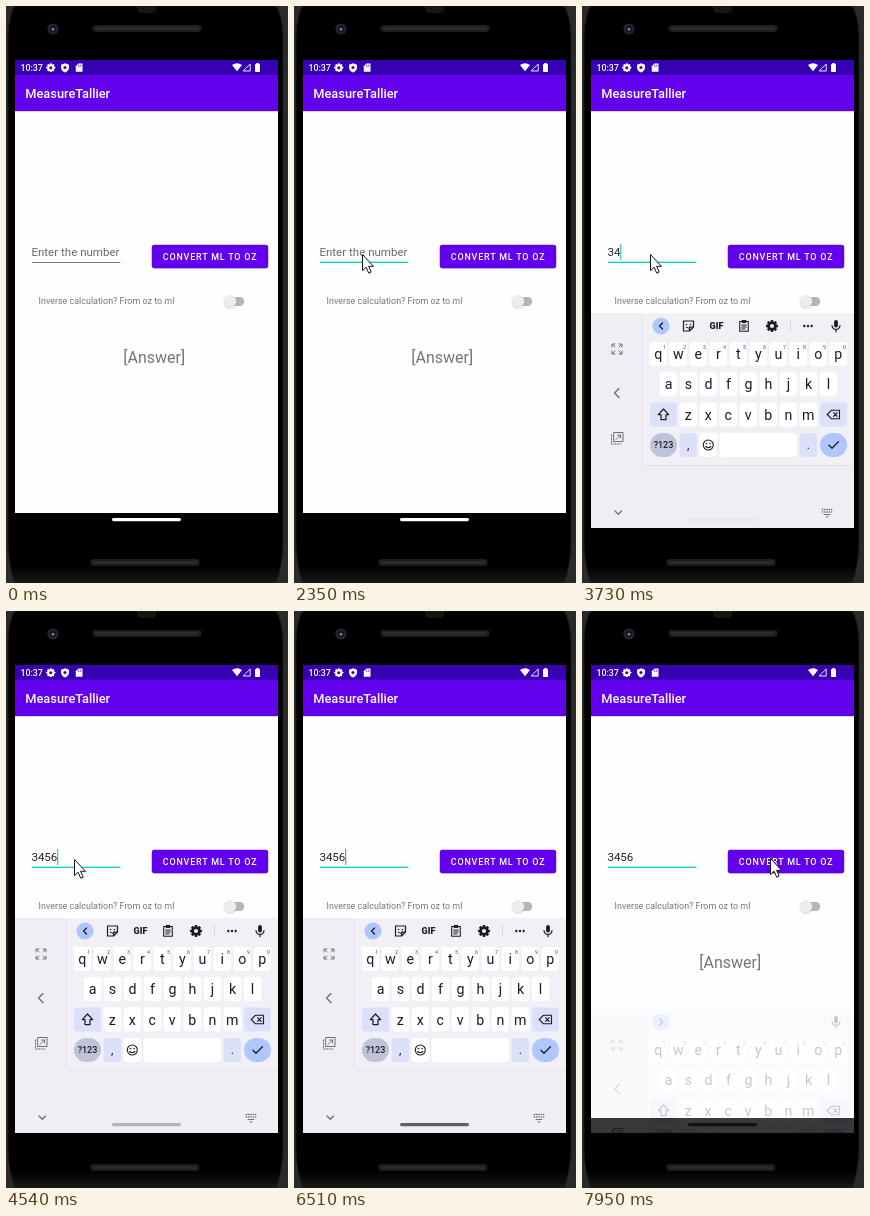
An HTML page for the animation above (8 s loop, 282x577 px).

```html
<!DOCTYPE html>
<html lang="en">
<head>
<meta charset="utf-8">
<title>Unit conversion</title>
<style>
html, body { margin: 0; width: 100%; height: 100%; overflow: hidden; background: #000; }
svg { display: block; width: 100%; height: 100%; font-family: Roboto, Arial, sans-serif; }
text { white-space: pre; }
.line { fill: none; stroke-linecap: round; stroke-linejoin: round; }
</style>
</head>
<body>
<svg id="stage" viewBox="0 0 282 577" xmlns="http://www.w3.org/2000/svg"></svg>
<script>
const LOOP = 8000;
const INK = '#1b1b20', SOFT = '#dce1f9', ACCENT = '#b0c6ff', GREY = '#6f6f76';

const rect = (x, y, w, h, fill, r = 0, more = '') =>
  `<rect x="${x}" y="${y}" width="${w}" height="${h}" rx="${r}" fill="${fill}" ${more}/>`;
const circle = (x, y, r, fill, more = '') =>
  `<circle cx="${x}" cy="${y}" r="${r}" fill="${fill}" ${more}/>`;
const text = (x, y, size, fill, str, more = '') =>
  `<text x="${x}" y="${y}" font-size="${size}" fill="${fill}" ${more}>${str}</text>`;
const line = (d, color, w = 1, more = '') =>
  `<path class="line" d="${d}" stroke="${color}" stroke-width="${w}" ${more}/>`;
const at = (x, y, body) => `<g transform="translate(${x} ${y})">${body}</g>`;
const MID = 'text-anchor="middle"';

function gear(r, color, hole) {
  let teeth = '';
  for (let i = 0; i < 8; i++) {
    teeth += rect(-r * .2, -r, r * .4, r * 2, color, .3, `transform="rotate(${i * 45})"`);
  }
  return teeth + circle(0, 0, r * .78, color) + circle(0, 0, r * .36, hole);
}

function phone() {
  return '<linearGradient id="shell" x2="0" y2="1"><stop offset=".97"/><stop offset="1" stop-color="#181818"/></linearGradient>' +
    rect(0, 0, 282, 577, '#292a2a') +
    '<path d="M9 0Q3 8 2 30V540Q3 562 9 577H270Q276 562 277 540V30Q276 8 270 0Z" fill="url(#shell)" stroke="#1a1a1a"/>' +
    rect(131, -5, 19, 12, '#151515', 4) +
    circle(47, 23, 5.6, '#242629') + circle(47, 23, 3.6, '#15181f') + circle(47, 23.2, 1.3, '#7388c0') +
    rect(86.5, 19, 109, 7, '#1d1d1d', 3) + rect(89, 21, 104, 3, '#2b2b2b', 1.5) +
    rect(84.5, 553, 109, 7, '#1d1d1d', 3) + rect(87, 555, 104, 3, '#2b2b2b', 1.5);
}

function statusBar() {
  const W = '#fff';
  return rect(9, 54, 263, 15.2, '#3700b3') +
    text(14.4, 65, 8.8, W, '10:37', 'font-weight="500"') +
    at(44.8, 61.7, gear(4.3, W, '#3700b3')) +
    `<path d="M59 57.2L63 58.7V61.7Q62.6 65 59 66.4Q55.4 65 55 61.7V58.7Z" fill="${W}"/>` +
    circle(59, 61.6, 1.5, '#3700b3') +
    `<path d="M72.5 57.6H76.5V65.8H69.8V60.2Z" fill="${W}"/>` +
    line('M72.8 59V60.7M74.8 59V60.7', '#3700b3', .7) +
    `<path d="M226 59Q231 55.6 236 59L231 65.3Z" fill="${W}"/>` +
    line('M244.2 58.4V65H237.6Z', W, .9) +
    rect(249, 58, 5, 8, W, .8) + rect(250.3, 57, 2.4, 2, W);
}

function app() {
  return rect(9, 54, 263, 453, '#fefefe') + statusBar() +
    rect(9, 69, 263, 36, '#6200ee') + rect(9, 105, 263, 1, '#dcdae0') +
    text(19.3, 92, 12.8, '#fff', 'MeasureTallier', 'font-weight="500"') +
    text(25.4, 250.1, 11.55, '#6a6a6a', 'Enter the number', 'id="hint"') +
    text(25.4, 250.1, 11.55, '#222', '', 'id="value"') +
    rect(26, 256, 88.3, 1, '#777', 0, 'id="under"') +
    rect(0, 238, 1, 16, '#03bfae', 0, 'id="caret"') +
    rect(145.8, 240, 116.4, 23, '#000', 3, 'opacity=".14"') +
    rect(145.8, 238.8, 116.4, 23.4, '#6200ee', 2.6) +
    text(204.1, 254, 8.96, '#fff', 'CONVERT ML TO OZ', `${MID} font-weight="500" letter-spacing=".8"`) +
    text(32.5, 298.2, 8.96, '#777', 'Inverse calculation? From oz to ml') +
    rect(219, 291, 19.2, 9, '#b5b5b5', 4.5) +
    circle(224, 296.1, 6.5, '#000', 'opacity=".16"') + circle(224, 295.4, 6.3, '#ececec') +
    text(148.3, 356.8, 16, '#757575', '[Answer]', MID);
}

function key(x, y, label, hint = '') {
  return rect(x - 8.7, y, 17.4, 24, '#fff', 3.2) +
    text(x, y + 17, 14.2, INK, label, MID) +
    (hint && text(x + 6.2, y + 6.6, 5.4, '#55555c', hint, MID));
}

const keyRow = (letters, x, y, hints = '') =>
  [...letters].map((c, i) => key(x + i * 20, y, c, hints[i])).join('');

function toolbar() {
  return at(106.5, 320, line('M-5 -5H5V1L1 5H-5ZM5 1H1V5', INK, 1.2) +
      circle(-2, -1.5, .8, INK) + circle(2, -1.5, .8, INK) + line('M-2.4 1.2Q0 3.2 2.2 1.2', INK, 1)) +
    text(134.5, 323.4, 9, INK, 'GIF', `${MID} font-weight="900"`) +
    at(162, 320, line('M-4.3 -4.5H4.3V5.3H-4.3ZM-2.3 -1H2.3M-2.3 1H2.3M-2.3 3H1', INK, 1.1) +
      rect(-2.5, -6, 5, 3, INK, 1)) +
    at(190, 320, gear(5.8, INK, '#f1eff6')) +
    rect(208, 314, .8, 12, '#d2d0d8') +
    [-3.7, 0, 3.7].map(d => circle(226 + d, 320, 1.2, INK)).join('');
}

function keyboard() {
  const side = 'M-5 -2V-5H-2M2 -5H5V-2M5 2V5H2M-2 5H-5V2M-2 -2L-4.5 -4.5M2 -2L4.5 -4.5M2 2L4.5 4.5M-2 2L-4.5 4.5';
  const low = 427;
  return rect(9, 307, 263, 215, '#f0eef4') +
    '<path d="M60 307H272V460H65Q60 460 60 455Z" fill="#f2f0f7"/>' +
    line('M60.5 309V454Q60.5 459.5 66 459.5H272', '#e4e2e9', 1) +
    at(35, 343, line(side, GREY, 1)) +
    line('M37 382.5L32.5 387L37 391.5', GREY, 1.4) +
    at(35, 432, line('M-3 -5.5H6V3.5H-3ZM-1 1.5L3.5 -3M.5 -3H3.5V0', GREY, 1) +
      line('M-5.5 -3V6H4', GREY, 1, 'stroke-dasharray="1.5 1.5"')) +
    line('M33 505L36.3 508.3L39.6 505', GREY, 1.3) +
    at(245, 506, line('M-4.7 -2.5H4.7M-4.7 0H4.7', GREY, 1.4, 'stroke-dasharray=".4 1.9"') +
      line('M-3 2.5H3M-1 4.6L0 5.4L1 4.6', GREY, 1)) +
    circle(79, 320, 8.6, ACCENT) +
    at(79, 320, line('M1.5 -3L-1.5 0L1.5 3', INK, 1.3, 'id="fold"')) +
    `<g id="tools">${toolbar()}</g>` +
    at(254, 320, rect(-1.9, -6, 3.8, 7.5, INK, 1.9) + line('M-4 -.5Q-3.6 3.4 0 3.4Q3.6 3.4 4 -.5M0 3.4V5.7', INK, 1.2)) +
    keyRow('qwertyuiop', 76.3, 336, '1234567890') +
    keyRow('asdfghjkl', 86.5, 366) +
    keyRow('zxcvbnm', 106.3, 396.5) +
    rect(68, 396.5, 27, 24, SOFT, 3.2) +
    line('M81.5 403L76.3 408.6H79V413.6H84V408.6H86.7Z', INK, 1.2) +
    rect(238, 396.5, 27, 24, SOFT, 3.2) +
    line('M249.3 404.3H257.5V412.7H249.3L245.3 408.5ZM251.6 406.6L255.2 410.3M255.2 406.6L251.6 410.3', INK, 1.1) +
    rect(68, low, 27, 24, '#bfc3d9', 12) + text(81.5, low + 15.4, 9, INK, '?123', `${MID} font-weight="500"`) +
    rect(97.6, low, 17.4, 24, SOFT, 3.2) + text(106.3, low + 16, 12, INK, ',', MID) +
    rect(117.6, low, 17.4, 24, '#fff', 3.2) +
    at(126.3, low + 12, line('M5 0A5 5 0 1 1 -5 0A5 5 0 1 1 5 0M-2.6 1.5Q0 4 2.6 1.5', INK, 1.1) +
      circle(-1.8, -1.4, .8, INK) + circle(1.8, -1.4, .8, INK)) +
    rect(137.6, low, 77.4, 24, '#fff', 3.2) +
    rect(217.6, low, 17.4, 24, SOFT, 3.2) + text(226.3, low + 16, 12, INK, '.', MID) +
    rect(238, low, 27, 24, ACCENT, 12) + line('M247 439.2L250 442.2L256.4 435.8', INK, 1.3);
}

const stage = document.getElementById('stage');
stage.innerHTML =
  '<clipPath id="screen"><rect x="9" y="54" width="263" height="468"/></clipPath>' +
  phone() + app() +
  `<g clip-path="url(#screen)"><g id="board">${keyboard()}</g></g>` +
  rect(106, 512, 69, 3.2, '#fff', 1.6, 'id="pill"') +
  '<path id="cursor" d="M.5 .5V16.6L4.1 13.2L6.7 19.2L9.2 18.1L6.6 12.3H11.5Z" fill="#fff" stroke="#15151c" stroke-linejoin="round"/>';

const part = id => document.getElementById(id);
const set = (id, name, v) => part(id).setAttribute(name, v);
const show = (id, on) => set(id, 'visibility', on ? 'visible' : 'hidden');

// Each track holds [start time, value...] until the next entry.
const pick = (track, t) => track.reduce((now, s) => t >= s[0] ? s : now);

const pointer = [[0, null], [510, 160, 567]];
for (let i = 1; i <= 6; i++) {
  const p = i / 6, e = p * p * (3 - 2 * p);
  pointer.push([540 + i * 120, 160 - 92 * e, 567 - 319 * e]);
}
pointer.push([5180, 98, 260], [5300, 123, 269], [5450, null],
  [6920, 208, 268], [7040, 198, 259], [7160, 189, 252], [7300, 188, 249], [7420, 188, 247]);

const typed = [[0, ''], [3370, '3'], [3730, '34'], [4120, '345'], [4420, '3456']];
const caret = [[0, 0], [1790, 1], [2350, 0], [3120, 1], [4940, 0], [5450, 1],
  [6000, 0], [6510, 1], [7040, 0], [7420, 1], [7950, 0]];
const board = [[0, 0, 215], [3490, .13, 160], [3610, .75, 45], [3730, 1, 0], [7950, .23, 91]];
const pill = [[0, '#fff'], [3730, '#e9e7ec'], [4420, '#d5d3d9'], [4540, '#b5b3ba'],
  [4820, '#858389'], [4940, '#605f65'], [7950, '#121214']];

function draw(t) {
  const [, x, y] = pick(pointer, t);
  show('cursor', x !== null);
  if (x !== null) set('cursor', 'transform', `translate(${x} ${y})`);

  const str = pick(typed, t)[1];
  part('value').textContent = str;
  show('hint', !str);
  const focused = t >= 1790;
  set('under', 'fill', focused ? '#03d0bd' : '#777');
  set('under', 'y', focused ? 255.7 : 256);
  set('under', 'height', focused ? 1.3 : 1);
  show('caret', pick(caret, t)[1]);
  set('caret', 'x', 25.4 + str.length * 6.45);
  set('caret', 'fill', t < 4940 ? '#03bfae' : '#6c7876');

  const [, alpha, drop] = pick(board, t);
  set('board', 'opacity', alpha);
  set('board', 'transform', `translate(0 ${drop})`);
  const closing = t >= 7950;
  show('tools', !closing);
  set('fold', 'transform', closing ? 'scale(-1 1)' : '');
  set('pill', 'fill', pick(pill, t)[1]);
}

function tick() {
  draw(performance.now() % LOOP);
  requestAnimationFrame(tick);
}
tick();
</script>
</body>
</html>
```
